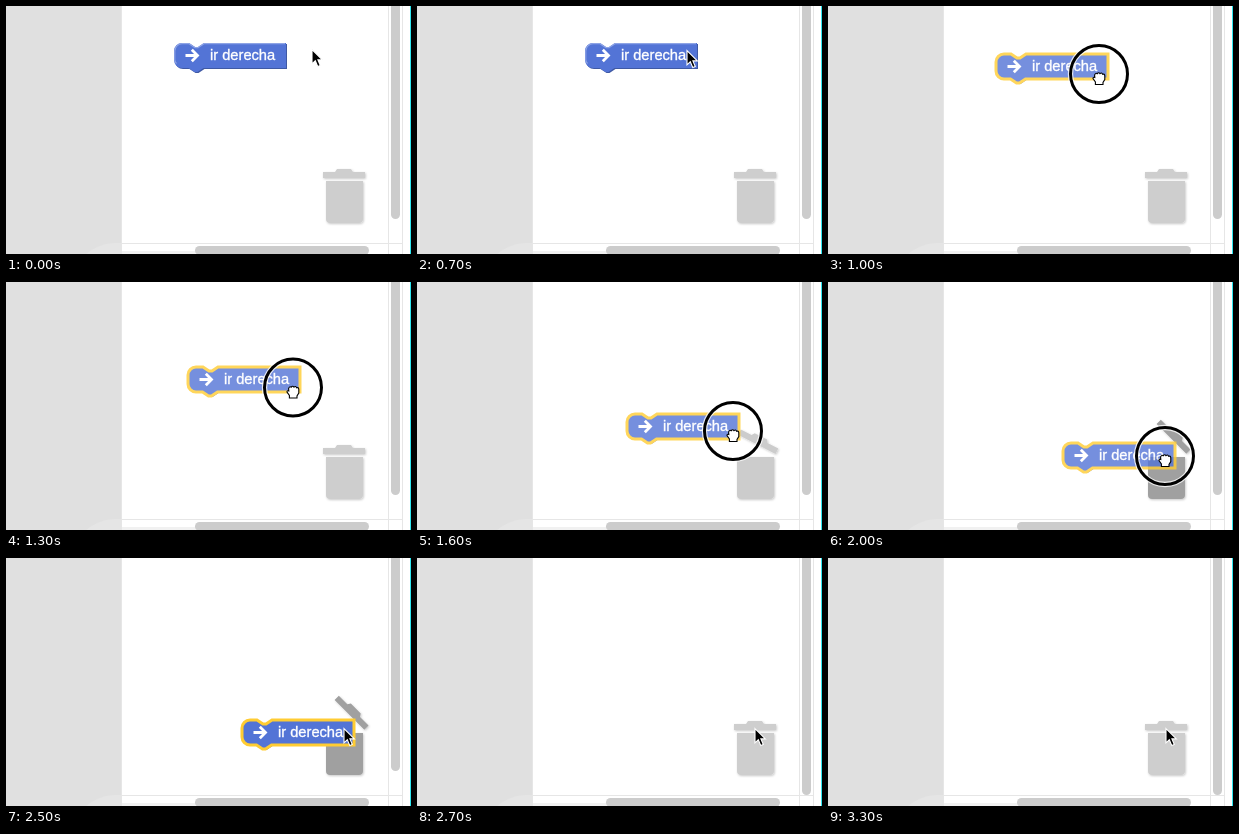
Recreate the animation shown at these times as an HTML page. Size 405 by 248 pixels, loop 3.6 s.

```html
<!DOCTYPE html>
<html lang="es">
<head>
<meta charset="utf-8">
<title>Bloque a la papelera</title>
<style>
html, body { margin: 0; width: 100%; height: 100%; overflow: hidden; background: #fff; }
svg { display: block; width: 405px; height: 248px; }
text { font: 14.67px "Liberation Sans", Arial, sans-serif; fill: #fff; stroke: #fff; stroke-width: .35px; }
</style>
</head>
<body>
<svg viewBox="0 0 405 248" xmlns="http://www.w3.org/2000/svg">
  <defs>
    <filter id="soft" x="-30%" y="-30%" width="160%" height="160%">
      <feDropShadow dx=".8" dy="1" stdDeviation="1" flood-color="#000" flood-opacity=".22"/>
    </filter>
    <path id="shape" d="M0 8A8 8 0 0 1 8 0H15l6 4h3l6-4H112V25H29.5l-6 4h-3l-6-4H8a8 8 0 0 1-8-8z"/>
  </defs>

  <rect width="405" height="248" fill="#fff"/>
  <rect width="115" height="248" fill="#e0e0e0"/>
  <path d="M115 237H108Q92 238 80 248H115z" fill="#e5e5e5"/>
  <rect x="115" y="245" width="75" height="3" fill="#f1f1f1"/>
  <path d="M115.5 0V248M382.5 0V248M396.5 0V248M115 237.5H396" stroke="#e6e6e6" fill="none"/>
  <rect x="404" width="1" height="248" fill="#2ee6f0"/>
  <rect x="189" y="240" width="174" height="9" rx="4.5" fill="#ccc"/>
  <rect id="scroll" x="385" y="-20" width="9" height="233" rx="4.5" fill="#ccc"/>

  <g id="trash" filter="url(#soft)">
    <path d="M320 175H357V213a4 4 0 0 1-4 4H324a4 4 0 0 1-4-4z"/>
    <path id="lid" d="M317 166H329l2-3H345l2 3H359V172H317z"/>
  </g>

  <g id="block">
    <use href="#shape" x="1" y="1" fill="#3f59a4"/>
    <use href="#shape" fill="#5374d6"/>
    <path id="light" d="M2.5 20.5A7 7 0 0 1 .8 17V8A7.5 7.5 0 0 1 8 .7H15l6 4h3l6-4H111" fill="none" stroke="#8ea4e5" stroke-width="1.2"/>
    <use id="glow" href="#shape" fill="none" stroke="#fc3" stroke-width="3"/>
    <path d="M11.5 12.5H23M17.8 6.8L23.5 12.5L17.8 18.2" fill="none" stroke="#fff" stroke-width="2.8"/>
    <text x="36" y="17">ir derecha</text>
  </g>

  <g id="pointer">
    <g id="ring" fill="none">
      <circle r="28.5" stroke="#fff" stroke-opacity=".8" stroke-width="5.4"/>
      <circle r="28.5" stroke="#000" stroke-width="3"/>
    </g>
    <path id="arrow" d="M0-3.5V10.8L3.3 7.8L5.8 13.6L8.3 12.5L5.9 6.9H10.4z" fill="#000" stroke="#fff" stroke-width="1.1"/>
    <path id="hand" d="M-3.6 10.5V8L-6 4.5Q-6 2.8-4.2 3.4L-4.4 1Q-3.4-1.6-1.8-.3Q-.4-2.2 1 -.4Q2.6-1.8 3.6 .3Q5.6-.4 5.8 1.8V5.6L4 8.4V10.5z" fill="#fff" stroke="#000" stroke-width="1.1"/>
  </g>
</svg>
<script>
const LOOP = 3600, STEP = 100;
const el = id => document.getElementById(id);

// Keys: [step, x, y]
const pointerPath = [[0, 306, 47], [1, 298, 48], [2, 282, 48.5], [3, 272, 48], [5, 272, 48], [7, 270, 48],
  [8, 271, 48], [9, 271, 50], [10, 271, 68], [13, 287, 105.5], [16, 316, 149], [18, 333, 168], [20, 337, 174], [21, 338, 174]];
const blockPath = [[9, 168, 37], [10, 168, 48], [13, 182, 85], [16, 210, 132], [18, 226, 153], [20, 235, 161], [21, 236, 162]];
const lidPath = [[15, 0, 0], [16, 27, .05], [17, 45, 1], [25, 45, 1], [26, 27, .4], [27, 0, 0]];

function along(path, step) {
  const next = path.findIndex(key => key[0] > step);
  if (next < 0) return path.at(-1).slice(1);
  if (next === 0) return path[0].slice(1);
  const [from, to] = [path[next - 1], path[next]];
  const k = (step - from[0]) / (to[0] - from[0]);
  return [1, 2].map(i => from[i] + (to[i] - from[i]) * k);
}

const show = (id, on) => el(id).setAttribute("visibility", on ? "visible" : "hidden");
const place = (id, [x, y]) => el(id).setAttribute("transform", `translate(${x} ${y})`);

function draw(time) {
  const step = Math.floor((time % LOOP) / STEP);
  const within = (a, b) => step >= a && step < b;
  const dragging = within(10, 23);

  place("pointer", along(pointerPath, step));
  show("ring", within(8, 21));
  show("hand", dragging);
  show("arrow", !dragging);

  place("block", along(blockPath, step));
  el("block").setAttribute("opacity", dragging ? .8 : 1);
  el("block").setAttribute("display", step < 26 ? "inline" : "none");
  show("glow", within(8, 26));
  show("light", step < 8);

  const [angle, dark] = along(lidPath, step);
  const grey = Math.round(206 - 46 * dark);
  el("lid").setAttribute("transform", `rotate(${angle} 359 171)`);
  el("trash").setAttribute("fill", `rgb(${grey},${grey},${grey})`);
  el("scroll").setAttribute("height", step < 26 ? 233 : 257);
}

const start = performance.now();
function tick() {
  draw(performance.now() - start);
  requestAnimationFrame(tick);
}
tick();
</script>
</body>
</html>
```
